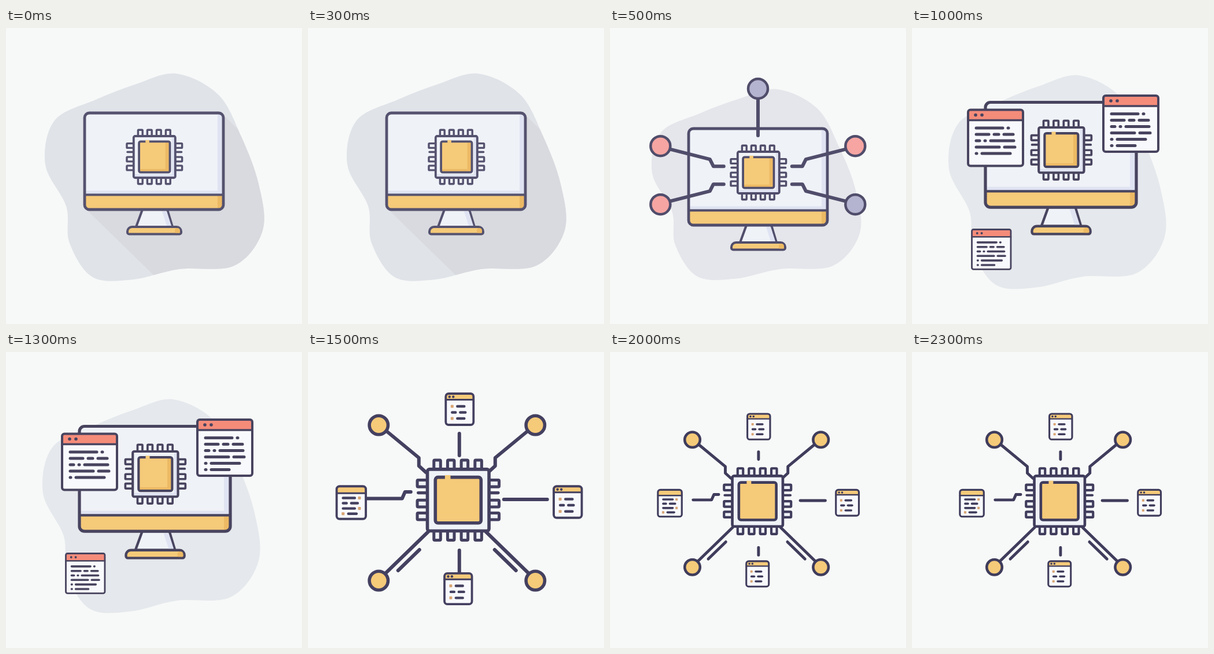
Animation, 512 px wide and 512 px high, one loop 2500 ms. Source, as an HTML page with a canvas:

```html
<!DOCTYPE html>
<html lang="en">
<head>
<meta charset="utf-8">
<title>Chip scenes</title>
<style>
html, body { margin: 0; width: 100%; height: 100%; overflow: hidden; background: #f7f9f8; }
canvas { display: block; width: 512px; height: 512px; }
</style>
</head>
<body>
<canvas id="stage" width="512" height="512"></canvas>
<script>
const ctx = document.getElementById('stage').getContext('2d');
const STEP = 500;
const BACK = '#f7f9f8', PALE = '#eff2f7', SHADE = '#dfe3f2', PAPER = '#f8f9fc';
const GOLD = '#f5ca79', AMBER = '#ecb964', CORAL = '#f58c7a', PINK = '#f6a5a2', LILAC = '#b5b4d0';
const SIDES = [-1, 1];
let ink;

function paint(fill, width) {
  if (fill) { ctx.fillStyle = fill; ctx.fill(); }
  if (width) { ctx.strokeStyle = ink; ctx.lineWidth = width; ctx.stroke(); }
}

// Box given by its left, top, right and bottom edges.
function box(x1, y1, x2, y2, radius, fill, width) {
  ctx.beginPath();
  ctx.roundRect(x1, y1, x2 - x1, y2 - y1, radius);
  paint(fill, width);
}

function disc(x, y, r, fill, width) {
  ctx.beginPath();
  ctx.arc(x, y, r, 0, Math.PI * 2);
  paint(fill, width);
}

function trace(...points) {
  ctx.beginPath();
  for (let i = 0; i < points.length; i += 2) ctx.lineTo(points[i], points[i + 1]);
}

function line(width, ...points) {
  trace(...points);
  paint(null, width);
}

function placed(x, y, sx, sy, draw) {
  ctx.save();
  ctx.translate(x, y);
  ctx.scale(sx, sy);
  draw();
  ctx.restore();
}

// Smooth closed curve through a few key points, from its top left corner.
const OUTLINE = [[230, 0], [302, 36], [342, 109], [372, 191], [379, 271], [330, 332], [235, 338],
  [155, 356], [85, 352], [45, 293], [39, 229], [3, 157], [19, 81], [90, 45], [160, 18]];

function blob(x, y, sx, sy, fill, shadow) {
  placed(x, y, sx, sy, () => {
    const n = OUTLINE.length, at = i => OUTLINE[(i + n) % n];
    ctx.beginPath();
    ctx.moveTo(...at(0));
    for (let i = 0; i < n; i++) {
      const [a, b, c, d] = [at(i - 1), at(i), at(i + 1), at(i + 2)];
      ctx.bezierCurveTo(b[0] + (c[0] - a[0]) / 6, b[1] + (c[1] - a[1]) / 6,
        c[0] - (d[0] - b[0]) / 6, c[1] - (d[1] - b[1]) / 6, ...c);
    }
    paint(fill);
    if (!shadow) return;
    ctx.clip();
    trace(73, 234, 193, 351, 400, 351, 400, 160, 311, 71, 311, 234);
    paint(shadow);
  });
}

// Centred on the chip's middle.
function chip(x, y, s, shaded) {
  const half = 36, core = 26.7, reach = 46.8, pin = 3.9;
  placed(x, y, s, s, () => {
    for (const side of SIDES) {
      placed(0, 0, side, side, () => {
        for (let i = 0; i < 4; i++) {
          const px = 16 * i - 24 - side * 0.5;
          box(px - pin, -reach, px + pin, -half, 1, PALE, 3.4);
        }
      });
      placed(0, 0, side, 1, () => {
        for (const py of [-19.5, 4, 19]) box(half, py - pin, reach + 1, py + pin, 1, PALE, 3.4);
        line(3.4, half + 1, -8.5, reach, -8.5);
      });
    }
    box(-half, -half, half, half, 2.5, PALE);
    if (shaded) {
      box(30, -34, 35, 34, 1, SHADE);
      box(-34, 30, 35, 34, 1, SHADE);
    }
    box(-half, -half, half, half, 2.5, null, 3.8);
    box(-core, -core, core, core, 3, GOLD);
    if (shaded) {
      box(19, -25, 25, 25, 1, AMBER);
      box(-25, 21, 25, 25, 1, AMBER);
    }
    box(-core, -core, core, core, 3, null, 3.8);
    ctx.fillStyle = GOLD;
    ctx.fillRect(-15.5, -core - 2.5, 6.5, 5);
  });
}

// Screen with the chip on it, placed by its top middle.
function monitor(x, y, s) {
  const w = 120, h = 167, bar = 141.5, foot = 197;
  placed(x, y, s, s, () => {
    trace(-20, h, -31, foot, 32, foot, 23, h);
    ctx.closePath();
    paint(PALE, 4);
    trace(14, h + 3, 22, h + 3, 30, foot - 2, 22, foot - 2);
    paint(SHADE);
    box(-46, foot, 47, foot + 12.5, [8, 8, 3, 3], GOLD, 4);
    box(36, foot + 2, 45, foot + 10.5, [6, 6, 2, 2], AMBER);
    box(-w, 0, w, h, 8, PALE);
    box(w - 10, 2, w - 2, bar, 2, SHADE);
    box(2 - w, bar - 7, w - 2, bar, 0, SHADE);
    box(-w, bar, w, h, [0, 0, 8, 8], GOLD);
    box(w - 10, bar, w, h, [0, 0, 8, 0], AMBER);
    line(3.8, -w, bar, w, bar);
    box(-w, 0, w, h, 8, null, 4.8);
    chip(0.8, 76, 1, true);
  });
}

// Dashes standing for words, wrapped like text.
const WORDS = [46, 1, 22, 8, 16, 6, 1, 40, 40, 18, 1, 49, 1, 31];

function codeWindow(x, y, s, rows) {
  const w = 95, h = 97, head = 18, wrap = 68, gap = 9;
  placed(x, y, s, s, () => {
    box(0, 0, w, h, 4, PAPER);
    box(0, 0, w, head, [4, 4, 0, 0], CORAL);
    line(3.6, 0, head, w, head);
    box(0, 0, w, h, 4, null, 4);
    for (const dx of [13, 24]) disc(dx, 9, 2.8, ink);
    let row = 0, col = 0;
    for (const word of WORDS) {
      if (col + word > wrap) { row++; col = 0; }
      if (row === rows) break;
      const ry = 31.5 + 11 * row;
      line(5, 14 + col, ry, 14 + col + word, ry);
      col += word + gap;
    }
  });
}

// Small page centred on its middle; rows alternate a bullet line and two words.
function card(x, y, s, wide) {
  const w = wide ? 50 : 48, h = wide ? 56 : 54, head = wide ? 12 : 10.5;
  placed(x, y, s, s, () => {
    ctx.translate(-w / 2, -h / 2);
    box(0, 0, w, h, 5, PAPER);
    box(0, 0, w, head, [5, 5, 0, 0], GOLD);
    line(3, 0, head, w, head);
    box(0, 0, w, h, 5, null, 3.8);
    if (!wide) for (const dx of [6.5, 13]) disc(dx, 5.5, 2.2, ink);
    const rows = wide ? 4 : 3, pitch = wide ? 9 : 10.5;
    for (let i = 0; i < rows; i++) {
      const ry = head + (wide ? 8 : 11.5) + pitch * i;
      const last = i === rows - 1, bulletEnd = wide && !last;
      if (i % 2 && !last) {
        line(4.4, 11, ry, 17, ry);
        line(4.4, 25, ry, w - 14, ry);
      } else {
        const dot = bulletEnd ? w - 11 : 11, start = bulletEnd ? 11 : 20;
        box(dot - 2.5, ry - 2.5, dot + 2.5, ry + 2.5, 1, '#d9a574');
        line(4.4, start, ry, w - (bulletEnd ? 19 : 16), ry);
      }
    }
  });
}

// Four wired nodes mirrored around the chip, plus one above.
function nodes() {
  for (const sx of SIDES) for (const sy of SIDES) {
    placed(255.8, 254.7, sx, sy, () => {
      line(6, 152, 45, 83, 27.5, 77, 15.5, 59, 15.5);
      disc(168.5, 50.5, 17, sx > 0 && sy > 0 ? LILAC : PINK, 4.5);
    });
  }
  line(6, 256, 122, 256, 186);
  disc(256, 105, 17, LILAC, 4.5);
}

// Chip with spokes to nodes and cards; trim shortens the straight spokes.
function hub(x, y, s, trim) {
  placed(x, y, s, s, () => {
    for (const side of SIDES) {
      placed(0, 0, side, 1, () => {
        line(6, 123, -125, 66, -78, 66, -64, 54, -53);
        line(6, 124, 122, 50, 50);
        line(6, 102, 117, 65, 81);
        for (const ny of [-134.5, 134.5]) disc(135.5, ny, 16.2, GOLD, 5.6);
      });
      line(6, 4, side * (82 + trim), 4, side * (120 - trim));
    }
    line(6, 81 + trim, -6, 156 - trim, -6);
    line(6, 2 * trim - 156, -7.5, -95, -7.5, -90, -19, -80, -19);
    chip(2, -4.8, 1.48);
    card(4.5, -162, 1);
    card(2, 148.5, 0.99);
    card(-183, -0.5, 1.01, true);
    card(191.5, -1.5, 1.01);
  });
}

const scenes = [
  () => {
    ink = '#55526f';
    blob(65, 79, 1, 1, '#e0e3e8', '#d8dadf');
    monitor(256, 147, 1);
  },
  () => {
    ink = '#504d6b';
    blob(70, 106, 0.955, 0.92, '#e4e6eb');
    monitor(256, 174, 1);
    nodes();
  },
  () => {
    ink = '#48445f';
    blob(61, 82, 0.992, 1.03, '#e5e8ec');
    monitor(257.5, 128.5, 1.0875);
    codeWindow(97, 141.5, 1, 5);
    codeWindow(331, 117, 1, 6);
    codeWindow(103.5, 348.5, 0.71, 6);
  },
  () => {
    ink = '#444060';
    hub(257.8, 261, 1, 0);
  },
  () => {
    ink = '#3f3c5c';
    hub(253.6, 262, 0.82, 11);
  }
];

ctx.lineCap = ctx.lineJoin = 'round';

function render(now) {
  ctx.fillStyle = BACK;
  ctx.fillRect(0, 0, 512, 512);
  scenes[Math.floor(Math.max(0, now) / STEP) % scenes.length]();
  requestAnimationFrame(render);
}
render(performance.now());
</script>
</body>
</html>
```
